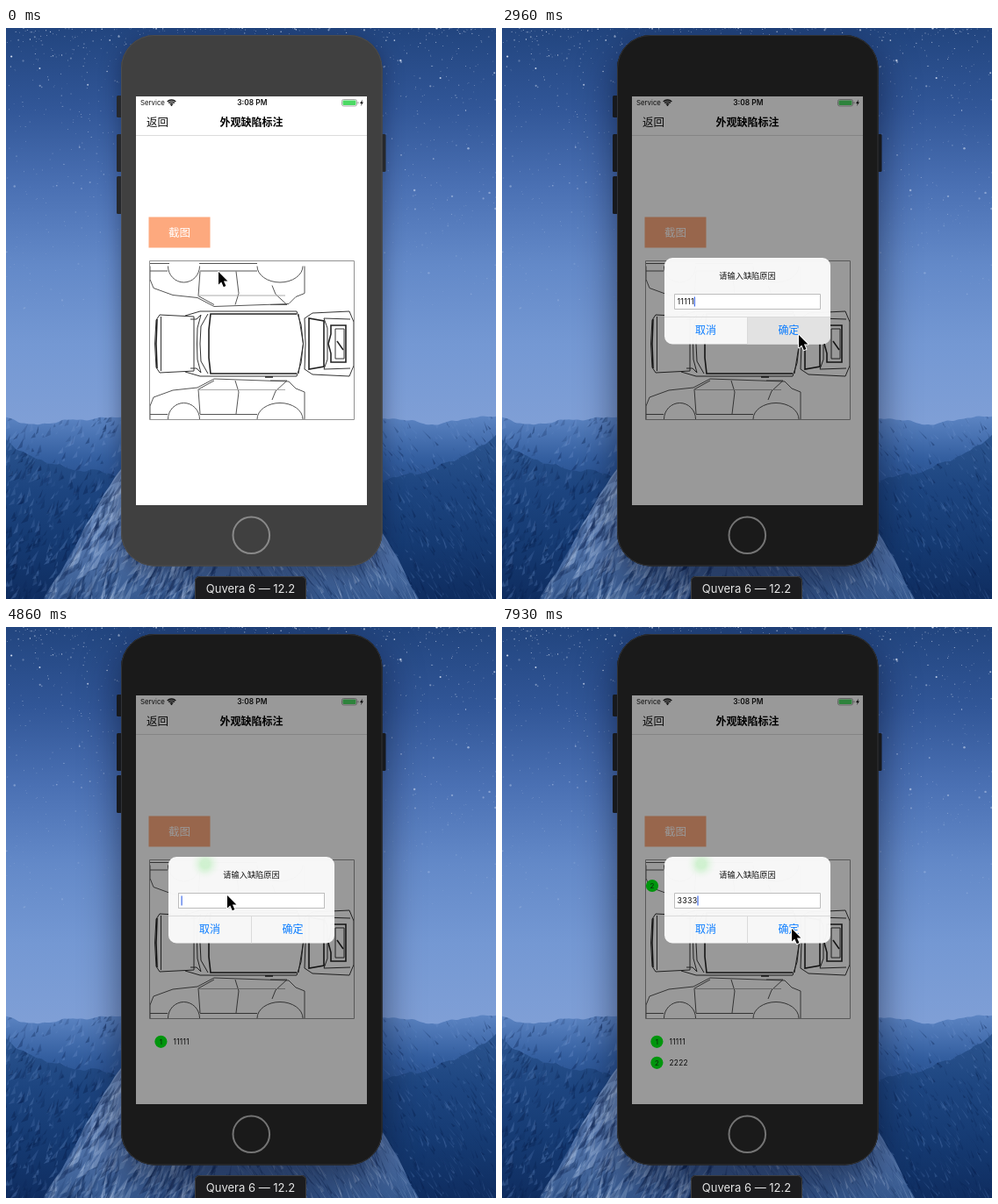
An HTML page with a canvas for the animation above (8 s loop, 558 by 651 pixels).

```html
<!DOCTYPE html>
<html lang="zh-CN">
<head>
<meta charset="utf-8">
<title>外观缺陷标注</title>
<style>
html, body { margin: 0; width: 100%; height: 100%; overflow: hidden; background: #2a4a86; }
canvas { display: block; }
</style>
</head>
<body>
<canvas id="stage" width="558" height="651"></canvas>
<script>
const W = 558, H = 651, LOOP = 8000, STEP = 118.48;
const FONT = '"Inter", "Noto Sans CJK SC", "Noto Sans CJK", sans-serif';
const BLUE = '#0a7cff', GREEN = '#00f815', RED = '#ff1a12';
const stage = document.getElementById('stage').getContext('2d');

const MOVES = [
  { from: 0, to: 2, x: 223, y: 273 },
  { from: 19, to: 22, x: 338, y: 350 },
  { from: 28, to: 34, x: 168, y: 293 },
  { from: 39, to: 41, x: 252, y: 306 },
  { from: 44, to: 47, x: 330, y: 346 },
  { from: 51, to: 54, x: 194, y: 351 },
  { from: 64, to: 67, x: 330, y: 344 }
];
const SESSIONS = [
  { open: 8, type: 16, close: 25, entry: '11111', x: 226, y: 274 },
  { open: 36, type: 43, close: 49, entry: '2222', x: 171, y: 295 },
  { open: 56, type: 62, close: Infinity, entry: '3333' }
];

function random(seed) {
  return () => (seed = (seed * 16807) % 2147483647) / 2147483647;
}

function layer(paint) {
  const c = document.createElement('canvas');
  c.width = W;
  c.height = H;
  paint(c.getContext('2d'));
  return c;
}

function box(g, x, y, w, h, r, fill, stroke) {
  g.beginPath();
  g.roundRect(x, y, w, h, r);
  if (fill) { g.fillStyle = fill; g.fill(); }
  if (stroke) { g.strokeStyle = stroke; g.lineWidth = 1; g.stroke(); }
}

function disc(g, x, y, r, fill) {
  g.beginPath();
  g.arc(x, y, r, 0, 7);
  g.fillStyle = fill;
  g.fill();
}

function text(g, s, x, y, size, color, align = 'left', weight = 400) {
  g.font = `${weight} ${size}px ${FONT}`;
  g.textAlign = align;
  g.fillStyle = color;
  g.fillText(s, x, y);
}

function trace(g, ...pts) {
  g.moveTo(pts[0], pts[1]);
  for (let i = 2; i < pts.length; i += 2) g.lineTo(pts[i], pts[i + 1]);
}

function ink(g, color, width, path) {
  g.beginPath();
  path();
  g.strokeStyle = color;
  g.lineWidth = width;
  g.stroke();
}

// Paints twice, the second time flipped about a horizontal axis.
function mirrored(g, axis, paint) {
  paint(g);
  g.save();
  g.translate(0, 2 * axis);
  g.scale(1, -1);
  paint(g);
  g.restore();
}

function ramp(g, y0, y1, ...colors) {
  const grad = g.createLinearGradient(0, y0, 0, y1);
  colors.forEach((c, i) => grad.addColorStop(i / (colors.length - 1), c));
  return grad;
}

function mountain(g, { seed, top, rough, ridge, colors, light, count, grain }) {
  const rnd = random(seed);
  const phase = Array.from({ length: 6 }, () => rnd() * 6.3);
  const noise = x => phase.reduce((sum, p, i) => sum + Math.sin(x * 0.03 * 1.8 ** i + p) / 1.7 ** i, 0);
  g.save();
  g.beginPath();
  g.moveTo(0, H);
  for (let x = 0; x <= W; x += 2) g.lineTo(x, ridge(x) + rough * noise(x));
  g.lineTo(W, H);
  g.fillStyle = ramp(g, top, H, ...colors);
  g.fill();
  g.clip();
  for (let i = 0; i < count; i++) {
    const x = rnd() * W, y = top + rnd() * (H - top);
    const len = grain * (0.3 + rnd()), lean = Math.sign(x - 257) * len * (0.2 + rnd() * 0.7);
    g.beginPath();
    trace(g, x, y, x + lean, y + len, x + lean * 0.6 + 1 + rnd() * 3, y + len * 0.8);
    const alpha = 0.1 + rnd() * 0.28;
    g.fillStyle = rnd() < 0.45 ? `rgba(${light},${alpha})` : `rgba(6,28,72,${alpha})`;
    g.fill();
  }
  g.restore();
}

function paintSky(g) {
  g.fillStyle = ramp(g, 0, 450, '#22457f', '#315697', '#4a70b3', '#6389c8', '#7498d3', '#7f9fd6');
  g.fillRect(0, 0, W, H);
  const rnd = random(4711);
  for (let i = 0; i < 1300; i++) {
    const x = rnd() * W, y = rnd() ** 1.7 * 320, big = rnd() ** 8;
    g.globalAlpha = (0.25 + 0.7 * rnd()) * (1 - y / 400);
    disc(g, x, y, 0.45 + big * 0.8, '#e8f0ff');
  }
  g.globalAlpha = 1;
  mountain(g, {
    seed: 91, top: 438, rough: 3.5, ridge: () => 446, count: 1800, grain: 10,
    colors: ['#6088c6', '#335e9f', '#1e4480', '#163a74', '#12336a'], light: '112,148,205'
  });
  mountain(g, {
    seed: 37, top: 462, rough: 5, ridge: x => 472 + 0.35 * Math.min(x, W - x), count: 2200, grain: 12,
    colors: ['#2c558f', '#1d4580', '#153a72', '#0f2d60'], light: '92,130,188'
  });
  mountain(g, {
    seed: 53, top: 500, rough: 5, ridge: x => 303 + 1.6 * Math.abs(x - 257), count: 2600, grain: 22,
    colors: ['#7d9bc9', '#5a7cb2', '#36598f'], light: '178,200,232'
  });
}

function paintPhone(g, active) {
  const body = active ? '#1a1a1a' : '#404040';
  const key = active ? '#17191d' : '#26282c';
  g.drawImage(sky, 0, 0);
  g.save();
  g.shadowColor = active ? 'rgba(0,8,30,.55)' : 'rgba(0,8,30,.4)';
  g.shadowBlur = active ? 44 : 24;
  g.shadowOffsetY = active ? 16 : 8;
  box(g, 131, 8, 297.5, 605.5, 38, body);
  box(g, 215, 625, 127, 40, 5, '#1c1c1e');
  g.restore();
  box(g, 126, 77, 6, 25, 1.5, key);
  for (const y of [121, 169]) box(g, 126, y, 6, 43, 1.5, key);
  box(g, 427, 121, 5.5, 43, 1.5, key);
  box(g, 131, 8, 297.5, 605.5, 38, body);
  box(g, 131.5, 8.5, 296.5, 604.5, 37.5, null, active ? '#303236' : '#4c4c4d');
  ink(g, active ? '#747474' : '#898989', 2, () => g.arc(279.3, 578.3, 20.8, 0, 7));
  box(g, 215.5, 625.5, 126, 40, 5, '#1c1c1e', '#3c3e42');
  text(g, 'Quvera 6 — 12.2', 278.5, 644.3, 13, '#e6e6e6', 'center');
}

function carSide(g) {
  const arch = (x, rx) => {
    g.moveTo(x - rx, 446);
    g.ellipse(x, 446, rx, 18.5, 0, Math.PI, 0);
  };
  ink(g, '#555', 1, () => {
    trace(g, 164, 446, 164, 431, 168, 421, 190, 413, 218, 410, 237, 400, 322, 403, 330, 411, 340, 415, 340, 446);
    trace(g, 163, 440.5, 184, 440.5);
    trace(g, 221, 440.5, 286, 440.5);
    trace(g, 221, 440, 219, 412, 237, 402);
    trace(g, 261, 402, 265, 415, 262, 440);
    trace(g, 301, 402, 320, 402, 307, 414, 303, 424);
    arch(202.5, 18);
    arch(312, 26);
  });
  ink(g, '#aaa', 1, () => trace(g, 219, 412.5, 318, 412.5));
}

function carTop(g) {
  ink(g, '#333', 1, () => {
    // Hood and windscreen
    trace(g, 169.5, 360, 171, 387, 175, 393, 214, 391, 214, 360);
    trace(g, 176.5, 360, 176.5, 391);
    trace(g, 204, 392, 221, 397, 235, 397);
    trace(g, 210, 388, 217, 388, 222, 393);
    trace(g, 217.5, 360, 218, 378, 222, 393);
    trace(g, 221, 360, 222, 380, 230, 394);
    // Roof
    trace(g, 235, 397, 331, 397, 336, 382, 338.5, 360, 333, 394);
    // Tail
    trace(g, 341, 360, 340, 389, 349, 395, 391, 397, 396, 385, 396, 360);
    trace(g, 366, 360, 366, 378, 362, 389, 392, 388);
    trace(g, 375, 360, 375, 377, 385, 377, 385, 360);
  });
  ink(g, '#222', 1.6, () => {
    trace(g, 231, 360, 231, 376, 233, 394, 331, 394);
    trace(g, 171, 360, 172, 388);
    trace(g, 345, 360, 345, 389, 362, 386, 362, 360);
    trace(g, 367, 360, 370, 371, 370, 381, 387, 381, 387, 360);
  });
}

function paintCar(g) {
  g.save();
  g.beginPath();
  g.rect(163, 265, 234, 182);
  g.clip();
  mirrored(g, 358.75, carSide);
  mirrored(g, 360, carTop);
  ink(g, '#222', 1.5, () => {
    trace(g, 295, 398, 304, 398);
    trace(g, 377, 357, 384, 367);
  });
  ink(g, '#555', 1, () => {
    trace(g, 163, 268.5, 186, 268.5);
    trace(g, 220, 268.5, 286, 268.5);
  });
  g.restore();
  box(g, 163.5, 265.5, 233, 181, 0, null, '#929292');
}

function paintApp(g) {
  g.fillStyle = '#fff';
  g.fillRect(148, 78, 263, 466);
  text(g, 'Service', 153, 88.3, 7.8, '#111');
  for (const r of [2.6, 4.8, 7]) ink(g, '#111', 1.4, () => g.arc(188.5, 89, r, -Math.PI * 0.74, -Math.PI * 0.26));
  disc(g, 188.5, 88.2, 0.9, '#111');
  text(g, '3:08 PM', 280.3, 88.3, 8.4, '#111', 'center', 600);
  box(g, 382.5, 81.5, 17, 7.5, 2, '#fff', '#aaa');
  box(g, 383.5, 82.5, 15, 5.5, 1, '#4cd964');
  box(g, 400.5, 84, 1, 2.5, 0.5, '#999');
  g.beginPath();
  trace(g, 406, 81.5, 403, 86, 404.8, 86, 404, 89, 407, 84.6, 405.2, 84.6);
  g.fillStyle = '#111';
  g.fill();
  text(g, '返回', 160, 112, 12.5, '#111');
  text(g, '外观缺陷标注', 279.5, 111.7, 12, '#000', 'center', 600);
  g.fillStyle = '#dcdcdc';
  g.fillRect(148, 122, 263, 1);
  g.fillStyle = '#fda97e';
  g.fillRect(162.5, 215.5, 70, 35);
  text(g, '截图', 197.4, 238, 12.5, '#fff', 'center');
  paintCar(g);
}

const sky = layer(paintSky);
const phones = [false, true].map(active => layer(g => paintPhone(g, active)));
const app = layer(paintApp);

function cursorAt(k) {
  let x = 242, y = 278;
  for (const m of MOVES) {
    const f = Math.min(1, Math.max(0, (k - m.from) / (m.to - m.from)));
    const ease = 1 - (1 - f) ** 2;
    x += (m.x - x) * ease;
    y += (m.y - y) * ease;
  }
  return [x, y];
}

function drawCursor(g, x, y) {
  g.save();
  g.translate(x, y);
  g.beginPath();
  trace(g, 0, 0, 0, 14.5, 3.3, 11.5, 5.8, 17.2, 8.4, 16.1, 5.9, 10.5, 10.4, 10.5);
  g.closePath();
  g.lineJoin = 'round';
  g.lineWidth = 2;
  g.strokeStyle = '#fff';
  g.stroke();
  g.fillStyle = '#000';
  g.fill();
  g.restore();
}

function typing(g, s, x, y, size) {
  g.letterSpacing = '0.25px';
  text(g, s, x, y, size, '#111');
  const end = x + g.measureText(s).width;
  g.letterSpacing = '0px';
  return end;
}

function badge(g, x, y, digit) {
  disc(g, x, y, 7.1, GREEN);
  text(g, digit, x, y + 2.9, 8, '#123d12', 'center');
}

function drawMarks(g, k) {
  SESSIONS.forEach(({ close, entry, x, y }, i) => {
    if (k <= close) return;
    const row = 472.8 + i * 24;
    badge(g, x, y, entry[0]);
    badge(g, 176.4, row, entry[0]);
    typing(g, entry, 190.5, row + 3, 8.4);
    // A new mark stays selected until the next tap.
    if (k < SESSIONS[i + 1].open) {
      box(g, x - 14.5, y - 13.5, 28, 27, 0, null, RED);
      box(g, x + 6.5, y - 13.5, 7.5, 7, 0, RED);
    }
  });
}

function drawDialog(g, s, k) {
  const leaving = k > s.close;
  const p = leaving ? 0.327 ** (k - s.close) : 1 - 0.25 ** (k - s.open);
  if (p < 0.05) return;
  g.save();
  g.beginPath();
  g.rect(148, 78, 263, 466);
  g.clip();
  g.fillStyle = `rgba(0,0,0,${0.4 * p})`;
  g.fillRect(148, 78, 263, 466);
  g.globalAlpha = p;
  const scale = leaving ? 1 : 1 + 0.2 * (1 - p);
  g.translate(279.5, 311);
  g.scale(scale, scale);
  g.translate(-279.5, -311);
  box(g, 185, 262, 189, 98.5, 9, 'rgba(251,251,251,.965)');
  g.clip();
  if (k > SESSIONS[0].close && s !== SESSIONS[0]) {
    const glow = g.createRadialGradient(227, 270, 5, 227, 270, 17);
    glow.addColorStop(0, 'rgba(190,238,190,.65)');
    glow.addColorStop(1, 'rgba(230,245,230,0)');
    g.fillStyle = glow;
    g.fillRect(205, 262, 45, 28);
  }
  if (k >= s.close) box(g, 280, 330, 95, 31, 0, '#e2e2e2');
  g.fillStyle = '#dadada';
  g.fillRect(185, 329, 189, 1);
  g.fillRect(279, 329, 1, 32);
  text(g, '请输入缺陷原因', 279.5, 286.4, 9.2, '#111', 'center');
  box(g, 196.5, 303.5, 166, 17, 0, '#fff', '#bdbdbd');
  const caret = typing(g, s.entry.slice(0, Math.max(0, k - s.type + 1)), 199.5, 315.3, 8.9);
  box(g, caret, 306.5, 1.2, 11, 0, '#3f6be8');
  text(g, '取消', 232, 349.4, 12, BLUE, 'center', 500);
  text(g, '确定', 326.5, 349.4, 12, BLUE, 'center');
  g.restore();
}

function draw(t) {
  const k = Math.floor((t + 11) / STEP);
  stage.drawImage(phones[k < 6 ? 0 : 1], 0, 0);
  stage.drawImage(app, 0, 0);
  drawMarks(stage, k);
  const session = SESSIONS.findLast(s => k > s.open);
  if (session) drawDialog(stage, session, k);
  drawCursor(stage, ...cursorAt(k));
}

const start = performance.now();
function tick() {
  draw((performance.now() - start) % LOOP);
  requestAnimationFrame(tick);
}
tick();
</script>
</body>
</html>
```
